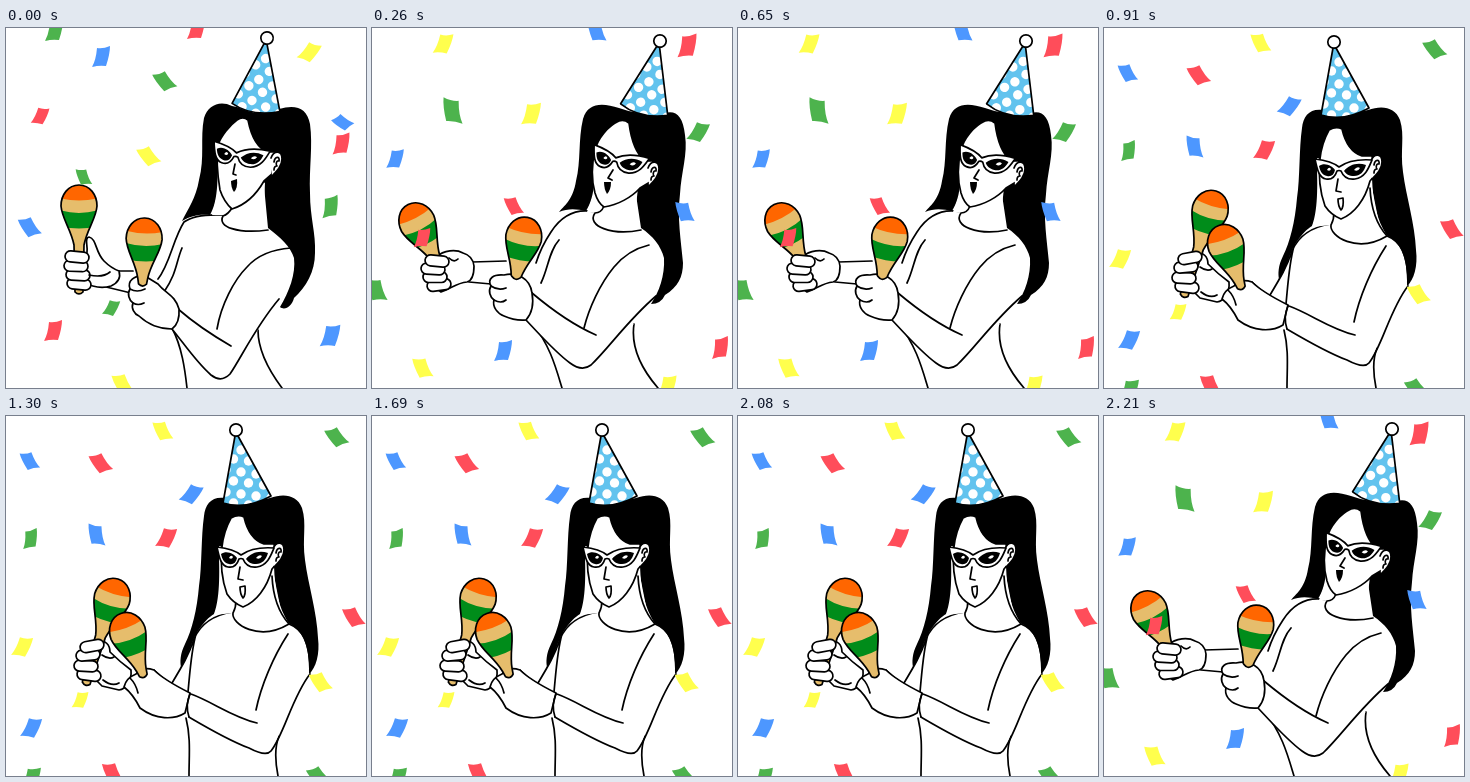
Write an HTML page that moves like this. It is 360 by 360 pixels and loops after 3210 ms.

```html
<!DOCTYPE html>
<html lang="en">
<head>
<meta charset="utf-8">
<title>Maraca party</title>
<style>
  html, body { margin: 0; width: 100%; height: 100%; overflow: hidden; background: #fff; }
  svg { display: block; width: 100vw; height: 100vh; }
  .pose { visibility: hidden; }
  .pose.on { visibility: visible; }
  .line, .skin { fill: none; stroke: #000; stroke-width: 1.7; stroke-linecap: round; stroke-linejoin: round; }
  .skin { fill: #fff; }
  .white { fill: #fff; }
</style>
</head>
<body>
<svg id="stage" viewBox="0 0 360 360">
  <defs>
    <clipPath id="cone"><path d="M-1,6L-13,73Q10,80 35,66L2,6Z"/></clipPath>
    <clipPath id="bulb"><path d="M0,-24C11,-24 18,-14 18,-3C17,10 8,20 5,36L-5,36C-8,20 -17,10 -18,-3C-18,-14 -11,-24 0,-24Z"/></clipPath>
    <g id="glasses">
      <path class="skin" d="M-25,-11C-17,-10 -7,-8 -1,-3C6,-8 18,-11 32,-10C29,-3 26,7 15,9C7,10 3,6 1,1Q-1,0 -3,1C-5,7 -9,10 -14,9C-21,8 -23,-1 -25,-11Z"/>
      <path d="M-21,-4C-15,-8 -8,-4 -5,0C-6,5 -9,7 -13,6C-18,5 -20,1 -21,-4ZM4,1C9,-5 17,-8 26,-5C24,2 20,6 14,6C9,6 6,4 4,1Z"/>
      <path class="white" d="M-13,0Q-11,-4 -9,-1Q-10,2 -13,0ZM14,0Q17,-4 20,-2Q18,2 14,0Z"/>
    </g>
    <g id="ear">
      <path class="skin" d="M-5,-5C-2,-13 6,-13 6,-4C6,3 1,8 -4,13"/>
      <path class="line" d="M-2,-1C-1,-7 4,-7 3,-2C1,-3 -1,1 1,3Q-2,3 -2,7"/>
    </g>
  </defs>
</svg>
<script>
const STEP = 130, LOOP = 3210, LAST = 17;
const colors = { r: '#ff4d5a', g: '#4db34d', b: '#4d97ff', y: '#ffff4d' };

const path = (cls, d) => `<path class="${cls}" d="${d}"/>`;
const place = (x, y, angle = 0, scale = '1') =>
  `transform="translate(${x} ${y}) rotate(${angle}) scale(${scale})"`;

// Each piece: colour, lean, then x, y, rotation, scale.
function confetti(list) {
  return list.split(' ').map(piece => {
    const [x, y, turn = 0, size = 1] = piece.slice(2).split(',').map(Number);
    const flip = piece[1] === '/' ? 1 : -1;
    return `<path fill="${colors[piece[0]]}" ${place(x, y, turn, `${flip * size} ${size}`)}
      d="M-4,-9Q2,-8 9,-11Q9,-3 5,9Q-2,8 -9,10Q-5,3 -4,-9Z"/>`;
  }).join('');
}

function hat([x, y, angle]) {
  let dots = '';
  for (let row = 0; row < 6; row++)
    for (let col = -2; col < 4; col++) {
      const cx = col * 15 + (row % 2) * 7.5 + 5, cy = 20 + row * 11 + col * 2;
      dots += `<circle class="white" cx="${cx}" cy="${cy}" r="4.7"/>`;
    }
  return `<g ${place(x, y, angle)}>
    <g clip-path="url(#cone)"><path fill="#62c3ee" d="M-20,0H45V85H-20Z"/>${dots}</g>
    ${path('line', 'M-1,6L-13,73Q10,80 35,66L2,6Z')}
    <circle class="skin" r="6.2"/></g>`;
}

function maraca([x, y, angle, length]) {
  const outline = `M0,-24C11,-24 18,-14 18,-3C17,10 8,20 5,36L4,${length}Q0,${length + 4} -4,${length}L-5,36C-8,20 -17,10 -18,-3C-18,-14 -11,-24 0,-24Z`;
  return `<g ${place(x, y, angle)}>
    <path fill="#e6bd6c" d="${outline}"/>
    <g clip-path="url(#bulb)">
      <path fill="#ff6600" d="M-20,-30H20V-11Q0,-6 -20,-11Z"/>
      <path fill="#008c1a" d="M-20,1Q0,7 20,1V17Q0,22 -20,17Z"/>
    </g>${path('line', outline)}</g>`;
}

const finger = ([x, y, angle]) =>
  `<rect class="skin" x="-12" y="-5.5" width="24" height="11" rx="5.5" ${place(x, y, angle)}/>`;

const poses = [
  {
    confetti: 'g/48,3 b/95,29 r/190,1 y/303,24,25 g\\159,53,-25 r/34,88,12,.85 y\\143,128,-25 b\\337,94,-42,.85 r/335,116,-3 g\\78,149,-8,.8 b\\24,199,-20 g/324,179,-8 g/105,280,15,.8 r/47,303 b/324,308,3,1.08 y\\117,356,-15',
    hat: [261, 10, 18], glasses: [231, 128, 9], ear: [270, 135],
    body: 'M218,187C198,186 186,188 178,194C167,211 164,236 152,251M176,220C170,234 171,245 158,264M166,300C176,319 179,342 181,360M252,302C252,322 264,344 276,360',
    hair: 'M226,78C214,72 202,77 198,90C194,110 199,130 193,152C190,170 182,181 176,193C186,187 195,186 204,187C213,172 212,145 211,120L258,158L262,200C274,209 285,219 288,230C290,246 283,264 274,279C279,283 286,278 288,270C300,259 309,244 309,225C310,205 304,190 304,165C303,140 307,118 304,96C301,80 290,76 273,81Q250,84 226,78Z',
    neck: 'M211,120L213,160L206,187L218,187C211,197 232,207 262,202C257,188 258,175 259,155Z',
    collar: 'M226,180C223,185 220,187 217,188C211,199 232,206 262,202',
    face: 'M231,92C224,97 215,108 212,117C210,132 212,150 214,162Q218,174 226,181C239,177 250,167 258,153L266,146L270,124L262,124C250,120 245,107 242,92Q237,88 231,92Z',
    features: 'M229,136L227,146L230,147', mouth: 'M225,153L231,151Q232,160 228,164Q225,160 225,153Z',
    arms: 'M111,243L127,243M96,258L125,265',
    first: [73, 181, 0, 83],
    hand: 'M81,224C82,217 78,210 83,209C91,211 89,224 98,233Q105,240 113,243Q116,253 105,258Q92,262 77,254Z',
    fingers: [[73, 256, 6], [72, 247, 3], [70, 238, 2], [71, 229, 5]],
    creases: 'M83,247Q97,250 104,244',
    forearm: 'M166,301C179,317 191,335 205,347Q215,355 224,346L252,302L225,318C205,307 187,296 173,283C168,266 160,266 152,256L139,248C128,247 121,253 124,261C121,266 123,272 127,275C125,280 128,286 133,288Q147,301 166,301Z',
    forearmLine: 'M172,281C187,294 206,307 225,318M166,301C179,317 191,335 205,347Q215,355 224,346C235,330 250,298 273,271',
    hand2: 'M139,248C128,247 121,253 124,261C121,266 123,272 127,275C125,280 128,286 133,288Q147,301 166,301Q174,295 173,281C169,267 160,266 152,256Z',
    front: 'M211,301C215,277 228,252 241,239Q256,222 285,220M124,261Q131,265 139,261M127,275Q132,278 138,275',
    second: [138, 214, 2, 42]
  },
  {
    confetti: 'b\\24,45,-15,.9 r\\95,47,-22 y\\157,15,-12,.95 g\\331,21,-25 b/185,78,24 g/24,123,-8,.9 b\\91,119,3 r/160,122,12 y/16,231,12 r\\348,201,-18 y\\315,266,-20 b/25,312,12 y/74,284,7,.82 g\\313,360,-28 g/25,362,5 r\\107,357,-12',
    hat: [230, 14, 0], glasses: [236, 142, 0], ear: [272, 138],
    body: 'M227,196C207,199 194,209 188,223C183,239 175,252 166,267M190,218C185,236 184,256 182,276M180,302C185,322 183,340 183,360M273,320Q267,335 272,360M283,208C296,213 304,225 304,256',
    hair: 'M219,82C206,80 199,88 198,100C195,120 196,150 193,170C191,194 186,214 179,228C174,238 174,246 175,251C184,239 185,225 192,215C198,206 203,201 208,198C215,180 213,150 213,130L266,150L277,205C296,211 304,228 303,258C310,252 314,238 312,222C311,196 302,168 299,144C296,122 301,108 296,92C291,79 278,77 264,82Q241,89 219,82Z',
    neck: 'M213,130L215,180L208,199L227,197C227,211 255,224 283,208C272,190 269,174 268,150Z',
    collar: 'M230,184C230,192 228,195 227,197C225,208 253,226 283,208C274,198 267,181 266,160',
    face: 'M225,102C220,111 217,121 216,131C214,150 217,167 221,178Q227,187 237,191C250,186 261,172 266,153L272,146L268,128L258,128C246,124 241,114 238,101Q232,98 225,102Z',
    features: 'M234,151L232,163L237,164', mouth: '', lips: 'M234,171L239,170Q240,179 237,182Q234,178 234,171Z',
    arms: '',
    first: [105, 186, 17, 85],
    hand: 'M92,226C99,223 104,229 104,236Q114,246 125,254C126,265 120,273 113,274L96,270L84,258Z',
    fingers: [[83, 259, 8], [80, 250, 3], [82, 239, -6], [86, 230, -10]],
    creases: 'M96,239Q103,244 108,241M97,264Q106,271 113,267',
    forearm: 'M183,301C200,311 222,324 243,332Q258,340 265,335L290,284L251,306L184,277C172,271 158,264 148,254Q136,250 130,258Q120,262 118,271Q127,278 134,292C150,304 168,304 179,297Z',
    forearmLine: 'M148,254C158,264 170,272 185,278C207,286 226,301 251,307M183,301C200,311 222,324 243,332Q260,341 265,335C278,319 286,281 304,258',
    hand2: 'M130,258Q120,262 118,271Q127,278 134,292C150,304 168,304 179,297L184,277C172,271 158,264 148,254Q136,250 130,258Z',
    front: 'M250,294C255,270 267,241 282,218M184,278Q179,289 183,301M124,262Q130,268 132,277',
    second: [123, 220, -20, 42]
  },
  {
    confetti: 'y/71,16,8 b\\225,3,-3 r/315,18,-2,1.1 g\\81,83,5,1.18 y/159,86,2,1.06 g/326,104,18 b/23,131,3,.92 r\\142,178,-14,.9 b\\313,184,-5,.98 r/50,210,0,.92 g\\5,262,-5,1.08 b/131,323 y\\51,340,-10 r/348,320,-6 y/295,358,3',
    hat: [288, 13, 22], glasses: [244, 133, 13], ear: [281, 145],
    body: 'M223,184C204,180 190,187 179,204Q169,219 164,235M187,212C177,223 176,241 169,255M160,295C178,317 184,340 190,360M262,296C258,323 273,345 286,360',
    hair: 'M247,80C231,75 216,74 211,91C206,112 209,133 204,153C201,171 194,176 187,184C196,180 205,181 214,183C224,168 223,145 223,120L263,160L269,200C281,208 289,218 292,230C293,248 287,264 279,276Q289,276 293,267C306,259 311,249 311,235C309,212 305,190 308,166C309,145 316,126 313,107C311,88 304,82 293,85Q269,88 247,80Z',
    neck: 'M223,120L224,160L215,184L223,185C215,198 240,208 269,202C262,191 264,178 266,160Z',
    collar: 'M232,178C230,183 226,185 223,185C214,198 240,208 269,202',
    face: 'M247,93C236,98 226,110 223,122C219,139 220,154 223,165Q226,175 232,179C246,177 260,169 268,160L278,154L281,133L273,133C264,126 259,111 257,95Q252,91 247,93Z',
    features: 'M241,142L236,150L240,152', mouth: 'M232,154L239,154Q239,162 235,166Q232,161 232,154Z',
    arms: 'M100,234L134,233M97,254L119,256',
    first: [47, 198, -27, 43],
    hand: 'M64,229C72,222 84,221 91,225Q101,228 102,238Q102,252 95,254C84,255 79,261 69,264L58,255Z',
    fingers: [[67, 257, -8], [63, 249, 0], [61, 241, 4], [65, 233, 6]],
    creases: 'M77,230Q82,235 86,231',
    forearm: 'M154,292C168,307 184,325 198,335Q210,344 219,337L262,296L224,307C200,296 179,281 160,265C158,250 145,244 132,247C121,246 115,251 119,258C116,263 118,269 122,272C120,279 126,286 132,288Q143,293 154,292Z',
    forearmLine: 'M160,265C179,281 201,297 224,307M154,292C168,307 184,325 198,335Q210,344 219,337C237,320 255,293 284,268',
    hand2: 'M132,247C121,246 115,251 119,258C116,263 118,269 122,272C120,279 126,286 132,288Q143,293 154,292Q163,282 160,265C158,250 145,244 132,247Z',
    front: 'M212,300C217,280 228,256 242,239Q256,222 277,217M119,258Q126,263 134,260M122,272Q129,276 134,272',
    second: [151, 213, 11, 37]
  }
];

function draw(p) {
  return `<g class="pose">
    ${path('line', p.body)}
    <path d="${p.hair}"/>
    ${path('white', p.neck)}
    ${path('line', p.collar)}
    ${path('skin', p.face)}
    <use href="#ear" ${place(...p.ear)}/>
    ${path('line', p.features)}
    <path d="${p.mouth}"/>
    ${path('line', p.lips || '')}
    <use href="#glasses" ${place(...p.glasses)}/>
    ${hat(p.hat)}
    ${path('line', p.arms)}
    ${path('skin', p.hand)}
    ${maraca(p.first)}
    ${p.fingers.map(finger).join('')}
    ${path('line', p.creases)}
    ${path('white', p.forearm)}
    ${path('line', p.forearmLine)}
    ${path('skin', p.hand2)}
    ${path('line', p.front)}
    ${maraca(p.second)}
    ${confetti(p.confetti)}
  </g>`;
}

const stage = document.getElementById('stage');
stage.insertAdjacentHTML('beforeend', poses.map(draw).join(''));
const groups = stage.querySelectorAll('.pose');
const start = performance.now();

function show(now) {
  const time = Math.max(0, now - start) % LOOP;
  const step = Math.min(LAST, Math.floor(time / STEP));
  groups.forEach((group, i) => group.classList.toggle('on', i === step % poses.length));
  requestAnimationFrame(show);
}
show(start);
</script>
</body>
</html>
```
